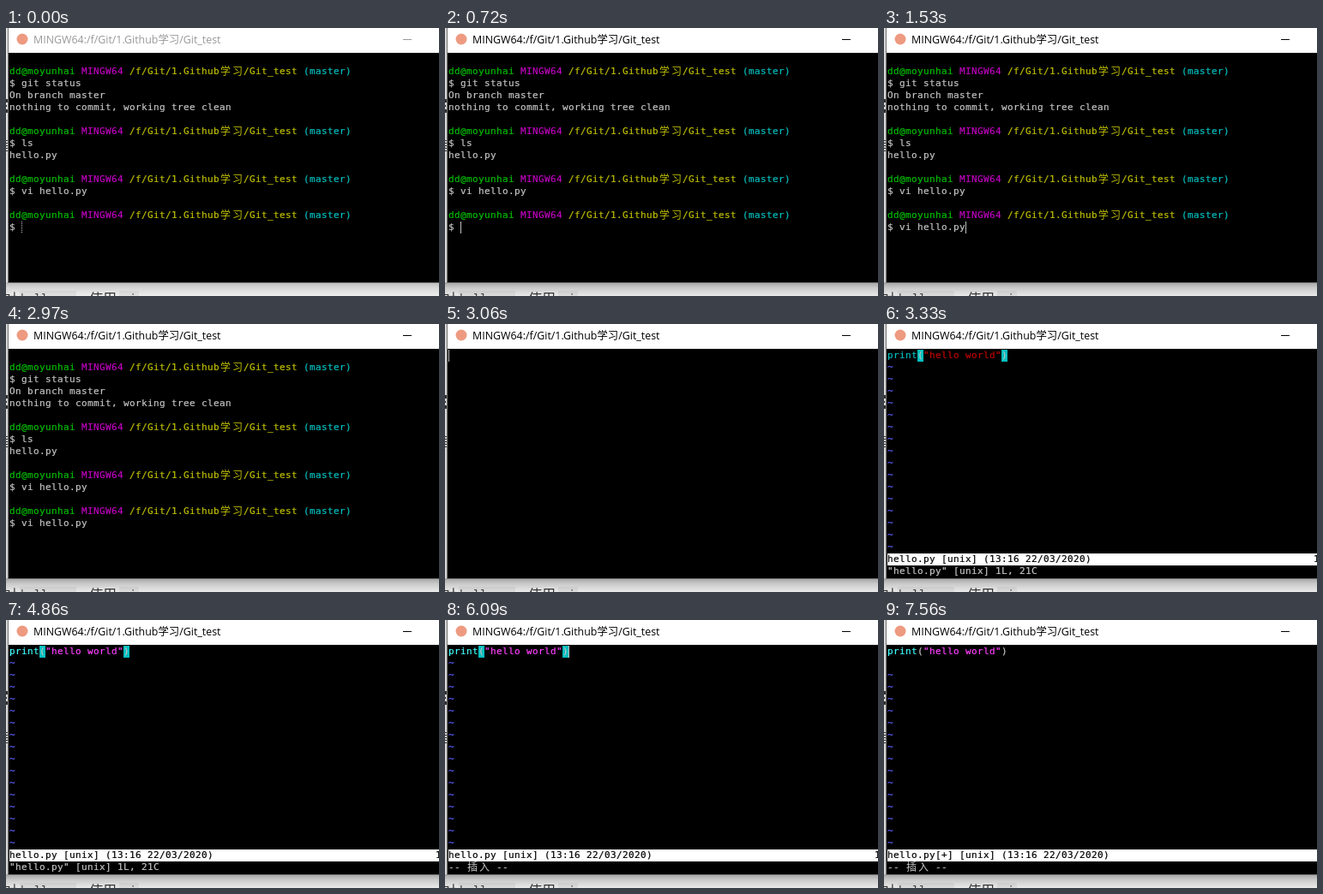
Animation, 505 px wide and 313 px high, one loop 8000 ms. Source, as an HTML page:

```html
<!DOCTYPE html>
<html lang="zh">
<head>
<meta charset="utf-8">
<title>Terminal session</title>
<style>
html, body { margin: 0; width: 100%; height: 100%; overflow: hidden; background: #f6f6f6; }
svg { display: block; width: 505px; height: 313px; }
text { white-space: pre; }
.mono { font-family: "DejaVu Sans Mono", monospace; font-size: 11px; letter-spacing: .378px; stroke-width: .2px; }
.cjk { font-family: "Noto Sans CJK SC", "Noto Sans CJK", sans-serif; font-size: 12px; letter-spacing: 2px; }
.title { font-family: "Open Sans", "Noto Sans CJK SC", "Noto Sans CJK", sans-serif; font-size: 12.4px; }
.page { font-family: "DejaVu Sans Mono", monospace; font-size: 13.3px; fill: #444; }
.note { font-family: "Noto Sans CJK SC", "Noto Sans CJK", sans-serif; font-size: 16px; fill: #333; }
</style>
</head>
<body>
<svg viewBox="0 0 505 313" xmlns="http://www.w3.org/2000/svg">
  <defs>
    <linearGradient id="below" x2="0" y2="1">
      <stop offset="0" stop-color="#000" stop-opacity=".34"/>
      <stop offset=".4" stop-color="#000" stop-opacity=".18"/>
      <stop offset="1" stop-color="#000" stop-opacity=".05"/>
    </linearGradient>
    <linearGradient id="beside">
      <stop offset="0" stop-color="#000" stop-opacity=".08"/>
      <stop offset="1" stop-color="#000" stop-opacity=".25"/>
    </linearGradient>
  </defs>

  <rect width="505" height="313" fill="#f6f6f6"/>
  <g fill="#333">
    <path d="M0 83h2v4h-2zM0 90h1v2h-1zM0 95h2v4h-2z"/>
    <path d="M0 131h3v1h-3zM0 134h3v1h-3zM0 137h3v1h-3zM0 140h3v1h-3zM0 143h3v1h-3z"/>
  </g>
  <path d="M16 307h66v6h-66zM132 307h23v6h-23z" fill="#e9e9e9"/>
  <text class="note" x="-3" y="322">对</text>
  <text class="page" x="17" y="320.5">hello.py</text>
  <text class="note" x="97" y="322">使用</text>
  <text class="page" x="136" y="320.5">vi</text>

  <g id="shadow">
    <rect y="297" width="505" height="16" fill="url(#below)"/>
    <rect width="3" height="297" fill="url(#beside)"/>
  </g>
  <rect x="2" width="1" height="298" fill="#777"/>
  <rect x="2" y="297" width="503" height="1" fill="#777"/>
  <rect x="3" width="502" height="29" fill="#fff"/>
  <circle cx="19" cy="13" r="6.5" fill="#ee9a80"/>
  <g id="caption">
    <text class="title" x="32" y="18">MINGW64:/f/Git/1.Github学习/Git_test</text>
    <rect x="463" y="13" width="10" height="1"/>
  </g>
  <rect x="3" y="29" width="502" height="268"/>
  <g id="screen"></g>
  <path id="cursor" stroke="#bfbfbf"/>
</svg>
<script>
const LOOP = 8000, CELL = 7, LINE = 14, LEFT = 4, TOP = 30;
const GREY = "#c4c4c4", GREEN = "#00bf00", PURPLE = "#bf00bf", YELLOW = "#bfbf00", TEAL = "#00bfbf";
const $ = id => document.getElementById(id);
const colX = col => LEFT + col * CELL;
const rowY = row => TOP + row * LINE;

function put(row, col, str, fill = GREY) {
  return `<text class="mono" x="${colX(col)}" y="${rowY(row) + 10}" fill="${fill}" stroke="${fill}">${str}</text>`;
}

// wide characters take two cells each
function putWide(row, col, str, fill = GREY) {
  return `<text class="cjk" x="${colX(col) + 1}" y="${rowY(row) + 10.5}" fill="${fill}">${str}</text>`;
}

function box(row, col, cells, fill) {
  return `<rect x="${colX(col)}" y="${rowY(row)}" width="${cells * CELL}" height="${LINE}" fill="${fill}"/>`;
}

function prompt(row) {
  return put(row, 0, "dd@moyunhai", GREEN) + put(row, 12, "MINGW64", PURPLE) +
    put(row, 20, "/f/Git/1.Github", YELLOW) + putWide(row, 35, "学习", YELLOW) +
    put(row, 39, "/Git_test", YELLOW) + put(row, 49, "(master)", TEAL) + put(row + 1, 0, "$");
}

function shell(typed) {
  return [1, 6, 10, 13].map(prompt).join("") +
    put(2, 2, "git status") + put(3, 0, "On branch master") +
    put(4, 0, "nothing to commit, working tree clean") +
    put(7, 2, "ls") + put(8, 0, "hello.py") + put(11, 2, "vi hello.py") +
    (typed ? put(14, 2, "vi hello.py") : "");
}

const message = put(18, 0, '"hello.py" [unix] 1L, 21C');
const insert = put(18, 0, "--") + putWide(18, 3, "插入") + put(18, 8, "--");

function editor({ bright = true, match = true, edited = false, foot }) {
  const [name, quoted] = bright ? ["#40ffff", "#ff40ff"] : [TEAL, "#bf0000"];
  let out = match ? box(0, 5, 1, TEAL) + box(0, 19, 1, TEAL) : "";
  out += put(0, 0, "print", name) + put(0, 5, "(") + put(0, 6, '"hello world"', quoted) + put(0, 19, ")");
  for (let row = edited ? 2 : 1; row < 17; row++) out += put(row, 0, "~", "#6060ff");
  out += box(17, 0, 72, "#fff") +
    put(17, 0, `hello.py${edited ? "[+]" : ""} [unix] (13:16 22/03/2020)`, "#000");
  if (!edited) out += put(17, 71, "1", "#000");
  return out + foot;
}

const screens = [
  [0, shell(false)],
  [1530, shell(true)],
  [3060, ""],
  [3210, message],
  [3330, editor({ bright: false, foot: message })],
  [3360, editor({ foot: message })],
  [6060, editor({ foot: insert })],
  [7020, editor({ match: false, edited: true, foot: insert })]
];

// time, row, column; no row means hidden
const cursors = [
  [0, 14, 2], [1140], [1530, 14, 13], [2070], [2460, 15, 0], [2970],
  [3060, 0, 0], [3210], [3360, 0, 19], [3840], [4350, 0, 19], [4860],
  [5370, 0, 19], [5910], [6090, 0, 20], [6630], [7050, 1, 0], [7560]
];

const latest = (list, t) => list.findLast(item => item[0] <= t);
let shown;

function draw(t) {
  const active = t >= 720;
  $("caption").setAttribute("fill", active ? "#000" : "#999");
  $("shadow").setAttribute("opacity", active ? 1 : 0.7);

  const screen = latest(screens, t);
  if (screen !== shown) {
    $("screen").innerHTML = screen[1];
    shown = screen;
  }

  const [, row, col] = latest(cursors, t);
  const cursor = $("cursor");
  cursor.setAttribute("d", row === undefined ? "" : `M${colX(col) + 0.5} ${rowY(row)}v${LINE}`);
  cursor.setAttribute("stroke-dasharray", active ? "none" : "1 1");
}

function tick() {
  draw(performance.now() % LOOP);
  requestAnimationFrame(tick);
}
tick();
</script>
</body>
</html>
```
